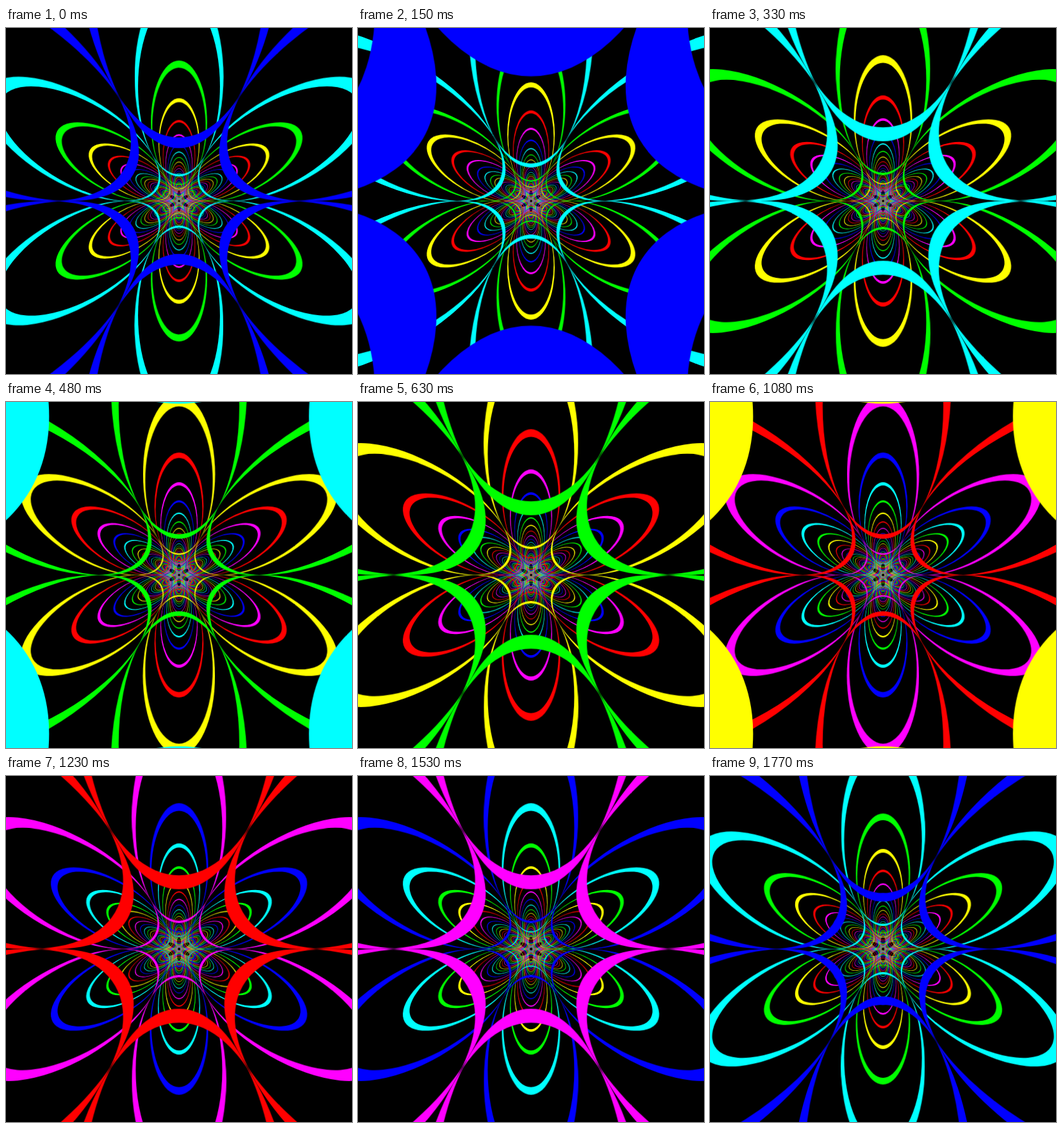
Recreate the animation shown at these times as an HTML page without scripts. Size 540 by 540 pixels, loop 1.8 s.

```html
<!DOCTYPE html>
<html lang="en">
<head>
<meta charset="utf-8">
<title>Star tunnel</title>
<style>
@property --q { syntax: "<number>"; inherits: true; initial-value: 0; }
html, body { margin: 0; width: 100%; height: 100%; overflow: hidden; background: #000; }
svg { display: block; width: 100vw; height: 100vh; animation: fly 1800ms steps(60) -1ms infinite; }
@keyframes fly { from { --q: 0; } to { --q: 6; } }

/* Six tubes side by side, seen from between them. --p is the depth of a
   ring's front edge; its back edge lies .145 deeper. */
.rings > g {
  --p: max(.02, var(--i) + .723 - var(--q));
  transform: scale(calc(.597 / var(--p)));
  opacity: calc((var(--p) - .1) * 1000);
}
.back { transform: scale(calc(var(--p) / (var(--p) + .145))); }
.rings > :nth-child(6n+1) { fill: #f0f; }
.rings > :nth-child(6n+2) { fill: #f00; }
.rings > :nth-child(6n+3) { fill: #ff0; }
.rings > :nth-child(6n+4) { fill: #0f0; }
.rings > :nth-child(6n+5) { fill: #0ff; }
.rings > :nth-child(6n) { fill: #00f; }
</style>
</head>
<body>
<svg viewBox="0 0 540 540">
<defs>
<ellipse id="e" cy="-560" rx="200" ry="440"/>
<g id="c">
<use href="#e"/><use href="#e" transform="rotate(60)"/><use href="#e" transform="rotate(120)"/>
<use href="#e" transform="rotate(180)"/><use href="#e" transform="rotate(240)"/><use href="#e" transform="rotate(300)"/>
</g>
<path id="b" d="M-2000-2000h4000v4000h-4000z" fill="#fff"/>
<mask id="out"><use href="#b"/><use href="#c" fill="#000"/></mask>
</defs>
<rect width="540" height="540"/>
<g class="rings" transform="translate(270 270)">
<g style="--i:35"><mask id="m35"><use href="#b"/><use href="#c" class="back" fill="#000"/></mask><use href="#c" mask="url(#m35)"/><g mask="url(#out)"><use href="#c" class="back"/></g></g>
<g style="--i:34"><mask id="m34"><use href="#b"/><use href="#c" class="back" fill="#000"/></mask><use href="#c" mask="url(#m34)"/><g mask="url(#out)"><use href="#c" class="back"/></g></g>
<g style="--i:33"><mask id="m33"><use href="#b"/><use href="#c" class="back" fill="#000"/></mask><use href="#c" mask="url(#m33)"/><g mask="url(#out)"><use href="#c" class="back"/></g></g>
<g style="--i:32"><mask id="m32"><use href="#b"/><use href="#c" class="back" fill="#000"/></mask><use href="#c" mask="url(#m32)"/><g mask="url(#out)"><use href="#c" class="back"/></g></g>
<g style="--i:31"><mask id="m31"><use href="#b"/><use href="#c" class="back" fill="#000"/></mask><use href="#c" mask="url(#m31)"/><g mask="url(#out)"><use href="#c" class="back"/></g></g>
<g style="--i:30"><mask id="m30"><use href="#b"/><use href="#c" class="back" fill="#000"/></mask><use href="#c" mask="url(#m30)"/><g mask="url(#out)"><use href="#c" class="back"/></g></g>
<g style="--i:29"><mask id="m29"><use href="#b"/><use href="#c" class="back" fill="#000"/></mask><use href="#c" mask="url(#m29)"/><g mask="url(#out)"><use href="#c" class="back"/></g></g>
<g style="--i:28"><mask id="m28"><use href="#b"/><use href="#c" class="back" fill="#000"/></mask><use href="#c" mask="url(#m28)"/><g mask="url(#out)"><use href="#c" class="back"/></g></g>
<g style="--i:27"><mask id="m27"><use href="#b"/><use href="#c" class="back" fill="#000"/></mask><use href="#c" mask="url(#m27)"/><g mask="url(#out)"><use href="#c" class="back"/></g></g>
<g style="--i:26"><mask id="m26"><use href="#b"/><use href="#c" class="back" fill="#000"/></mask><use href="#c" mask="url(#m26)"/><g mask="url(#out)"><use href="#c" class="back"/></g></g>
<g style="--i:25"><mask id="m25"><use href="#b"/><use href="#c" class="back" fill="#000"/></mask><use href="#c" mask="url(#m25)"/><g mask="url(#out)"><use href="#c" class="back"/></g></g>
<g style="--i:24"><mask id="m24"><use href="#b"/><use href="#c" class="back" fill="#000"/></mask><use href="#c" mask="url(#m24)"/><g mask="url(#out)"><use href="#c" class="back"/></g></g>
<g style="--i:23"><mask id="m23"><use href="#b"/><use href="#c" class="back" fill="#000"/></mask><use href="#c" mask="url(#m23)"/><g mask="url(#out)"><use href="#c" class="back"/></g></g>
<g style="--i:22"><mask id="m22"><use href="#b"/><use href="#c" class="back" fill="#000"/></mask><use href="#c" mask="url(#m22)"/><g mask="url(#out)"><use href="#c" class="back"/></g></g>
<g style="--i:21"><mask id="m21"><use href="#b"/><use href="#c" class="back" fill="#000"/></mask><use href="#c" mask="url(#m21)"/><g mask="url(#out)"><use href="#c" class="back"/></g></g>
<g style="--i:20"><mask id="m20"><use href="#b"/><use href="#c" class="back" fill="#000"/></mask><use href="#c" mask="url(#m20)"/><g mask="url(#out)"><use href="#c" class="back"/></g></g>
<g style="--i:19"><mask id="m19"><use href="#b"/><use href="#c" class="back" fill="#000"/></mask><use href="#c" mask="url(#m19)"/><g mask="url(#out)"><use href="#c" class="back"/></g></g>
<g style="--i:18"><mask id="m18"><use href="#b"/><use href="#c" class="back" fill="#000"/></mask><use href="#c" mask="url(#m18)"/><g mask="url(#out)"><use href="#c" class="back"/></g></g>
<g style="--i:17"><mask id="m17"><use href="#b"/><use href="#c" class="back" fill="#000"/></mask><use href="#c" mask="url(#m17)"/><g mask="url(#out)"><use href="#c" class="back"/></g></g>
<g style="--i:16"><mask id="m16"><use href="#b"/><use href="#c" class="back" fill="#000"/></mask><use href="#c" mask="url(#m16)"/><g mask="url(#out)"><use href="#c" class="back"/></g></g>
<g style="--i:15"><mask id="m15"><use href="#b"/><use href="#c" class="back" fill="#000"/></mask><use href="#c" mask="url(#m15)"/><g mask="url(#out)"><use href="#c" class="back"/></g></g>
<g style="--i:14"><mask id="m14"><use href="#b"/><use href="#c" class="back" fill="#000"/></mask><use href="#c" mask="url(#m14)"/><g mask="url(#out)"><use href="#c" class="back"/></g></g>
<g style="--i:13"><mask id="m13"><use href="#b"/><use href="#c" class="back" fill="#000"/></mask><use href="#c" mask="url(#m13)"/><g mask="url(#out)"><use href="#c" class="back"/></g></g>
<g style="--i:12"><mask id="m12"><use href="#b"/><use href="#c" class="back" fill="#000"/></mask><use href="#c" mask="url(#m12)"/><g mask="url(#out)"><use href="#c" class="back"/></g></g>
<g style="--i:11"><mask id="m11"><use href="#b"/><use href="#c" class="back" fill="#000"/></mask><use href="#c" mask="url(#m11)"/><g mask="url(#out)"><use href="#c" class="back"/></g></g>
<g style="--i:10"><mask id="m10"><use href="#b"/><use href="#c" class="back" fill="#000"/></mask><use href="#c" mask="url(#m10)"/><g mask="url(#out)"><use href="#c" class="back"/></g></g>
<g style="--i:9"><mask id="m9"><use href="#b"/><use href="#c" class="back" fill="#000"/></mask><use href="#c" mask="url(#m9)"/><g mask="url(#out)"><use href="#c" class="back"/></g></g>
<g style="--i:8"><mask id="m8"><use href="#b"/><use href="#c" class="back" fill="#000"/></mask><use href="#c" mask="url(#m8)"/><g mask="url(#out)"><use href="#c" class="back"/></g></g>
<g style="--i:7"><mask id="m7"><use href="#b"/><use href="#c" class="back" fill="#000"/></mask><use href="#c" mask="url(#m7)"/><g mask="url(#out)"><use href="#c" class="back"/></g></g>
<g style="--i:6"><mask id="m6"><use href="#b"/><use href="#c" class="back" fill="#000"/></mask><use href="#c" mask="url(#m6)"/><g mask="url(#out)"><use href="#c" class="back"/></g></g>
<g style="--i:5"><mask id="m5"><use href="#b"/><use href="#c" class="back" fill="#000"/></mask><use href="#c" mask="url(#m5)"/><g mask="url(#out)"><use href="#c" class="back"/></g></g>
<g style="--i:4"><mask id="m4"><use href="#b"/><use href="#c" class="back" fill="#000"/></mask><use href="#c" mask="url(#m4)"/><g mask="url(#out)"><use href="#c" class="back"/></g></g>
<g style="--i:3"><mask id="m3"><use href="#b"/><use href="#c" class="back" fill="#000"/></mask><use href="#c" mask="url(#m3)"/><g mask="url(#out)"><use href="#c" class="back"/></g></g>
<g style="--i:2"><mask id="m2"><use href="#b"/><use href="#c" class="back" fill="#000"/></mask><use href="#c" mask="url(#m2)"/><g mask="url(#out)"><use href="#c" class="back"/></g></g>
<g style="--i:1"><mask id="m1"><use href="#b"/><use href="#c" class="back" fill="#000"/></mask><use href="#c" mask="url(#m1)"/><g mask="url(#out)"><use href="#c" class="back"/></g></g>
<g style="--i:0"><mask id="m0"><use href="#b"/><use href="#c" class="back" fill="#000"/></mask><use href="#c" mask="url(#m0)"/><g mask="url(#out)"><use href="#c" class="back"/></g></g>
</g>
</svg>
</body>
</html>
```
